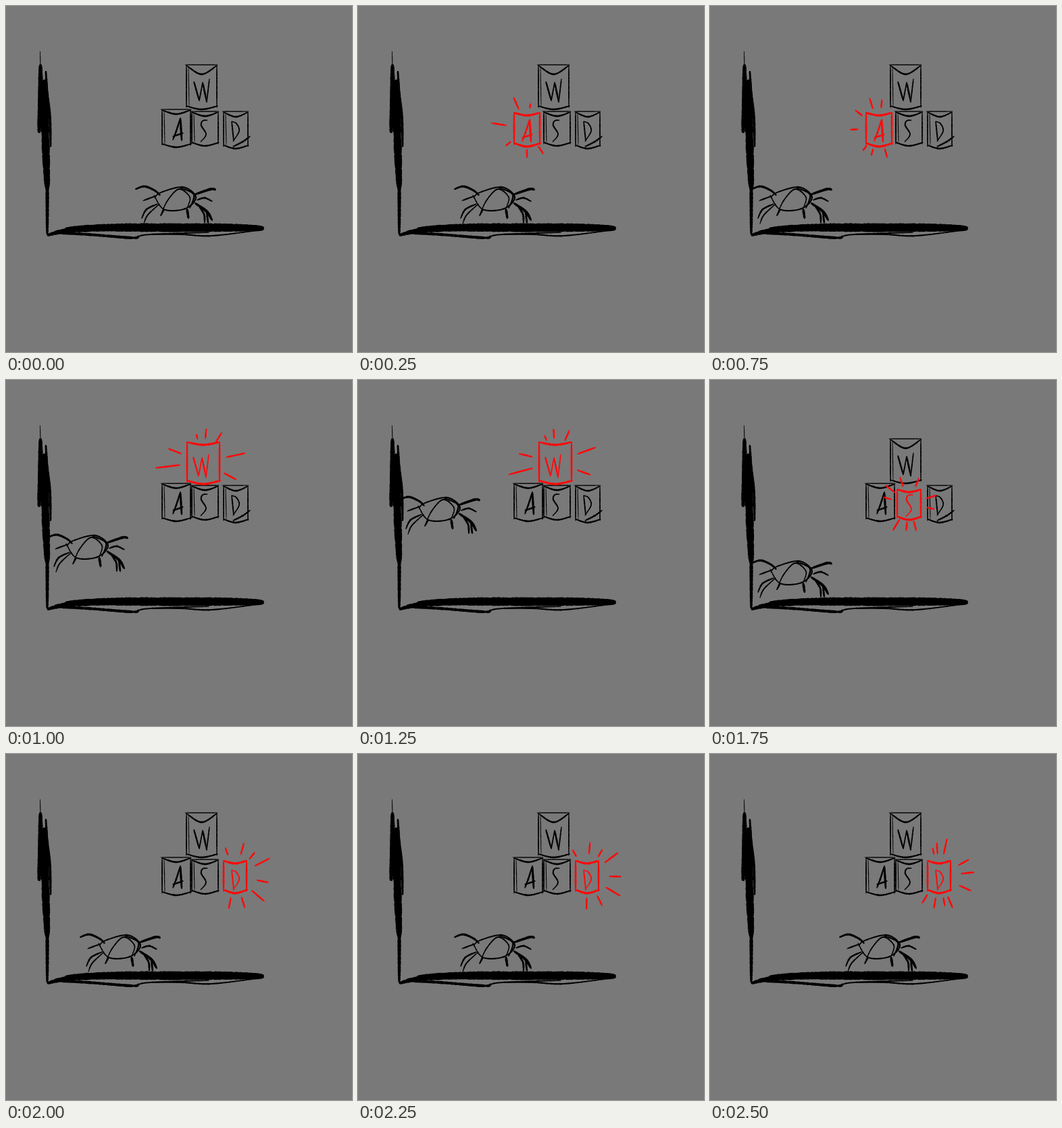
An HTML page with a canvas for the animation above (2.58 s loop, 512x512 px).

```html
<!DOCTYPE html>
<html lang="en">
<head>
<meta charset="utf-8">
<title>Crab controls</title>
<style>
html, body { margin: 0; width: 100%; height: 100%; overflow: hidden; background: #797979; }
canvas { display: block; width: 512px; height: 512px; }
</style>
</head>
<body>
<canvas id="stage" width="512" height="512"></canvas>
<script>
const ctx = document.getElementById('stage').getContext('2d');
const GRAY = '#797979', BLACK = '#000', RED = '#ff0a0a', LOOP = 2580;

const spline = (a, b, c, d, t) =>
  b + t * (c - a + t * (2 * a - 5 * b + 4 * c - d + t * (3 * (b - c) + d - a))) / 2;

// One brush stroke: a smooth line with tapered ends and a slightly rough edge.
function brush(width, ...pts) {
  const last = pts.length / 2 - 1;
  const at = (i, axis) => pts[2 * Math.max(0, Math.min(last, i)) + axis];
  let seed = Math.round(pts[0] * 31 + pts[1] * 17);
  ctx.beginPath();
  for (let i = 0; i < last; i++) {
    const steps = Math.ceil(Math.hypot(at(i + 1, 0) - at(i, 0), at(i + 1, 1) - at(i, 1)) / 0.7);
    for (let k = 0; k <= steps; k++) {
      const t = k / steps;
      const [x, y] = [0, 1].map(n => spline(at(i - 1, n), at(i, n), at(i + 1, n), at(i + 2, n), t));
      const taper = 0.5 + 0.5 * Math.sqrt(Math.max(0, Math.sin(Math.PI * (i + t) / last)));
      seed = (seed * 1103 + 12345) % 65536;
      const r = width / 2 * taper * (0.85 + 0.3 * seed / 65536);
      ctx.moveTo(x + r, y);
      ctx.arc(x, y, r, 0, 2 * Math.PI);
    }
  }
  ctx.fill();
}

function drawGround() {
  brush(1.2, 50.5, 67, 51, 92);
  brush(7, 51, 88, 51, 140, 49, 186);
  brush(4, 59, 97, 61, 130, 65, 165, 66, 208);
  brush(11, 57, 112, 58, 185, 61, 268);
  brush(5, 60, 200, 61, 262, 61, 337);
  brush(6, 62, 339, 90, 332, 130, 329);
  brush(11.5, 90, 331, 150, 328, 250, 328, 330, 328, 379, 329);
  brush(4, 75, 336, 120, 338, 186, 343, 196, 341);
  brush(2.2, 196, 341, 215, 338, 300, 335);
  brush(2.2, 215, 338, 260, 338, 305, 340, 380, 331);
}

function drawCrab() {
  brush(2.2, 220, 284, 229, 276, 262, 268, 281, 283, 265, 300, 234, 301, 219, 280);
  brush(2, 229, 310, 239, 288, 256, 271, 272, 283, 268, 299);
  brush(2.5, 258, 269, 278, 279, 272, 299);
  brush(3.2, 192, 271, 205, 267, 220, 273, 228, 280);
  brush(2.2, 203, 288, 222, 281);
  brush(2.6, 201, 314, 208, 301, 224, 293);
  brush(2, 204, 322, 210, 309, 227, 293);
  brush(2.5, 229, 310, 234, 301);
  brush(3.8, 268, 301, 270, 314);
  brush(3.8, 279, 279, 303, 271, 310, 272);
  brush(2.6, 283, 287, 294, 284, 305, 289);
  brush(4, 280, 292, 297, 304, 305, 317);
  brush(3, 286, 297, 293, 308, 294, 321);
  brush(3, 297, 304, 299, 321);
}

const letters = {
  W() {
    brush(2.6, 278, 112, 286, 140);
    brush(2, 286, 140, 291, 113);
    brush(2.6, 291, 113, 297, 142);
    brush(2, 297, 142, 301, 108);
  },
  A() {
    brush(2.6, 247, 198, 252, 185, 258, 166);
    brush(3.2, 258, 166, 260, 199);
    brush(2.6, 247, 193, 262, 188);
  },
  S() {
    brush(2.2, 298, 169, 291, 170, 289, 177, 296, 190, 288, 201);
  },
  D() {
    brush(2.2, 334, 171, 337, 200);
    brush(2, 334, 171, 341, 174, 345, 185, 336, 200);
  }
};

// box: left, top, right, bottom; glyph: letter shift when lit; ring: where rays begin
const keys = {
  W: { box: [267, 88, 312, 150], lid: 13, litBox: [268, 92, 316, 151], glyph: [-1, 2], ring: 35 },
  A: { box: [231, 154, 273, 206], lid: 6, litBox: [231, 158, 269, 205], glyph: [-4, 2], ring: 31 },
  S: { box: [275, 157, 314, 204], lid: 6, litBox: [277, 162, 312, 204], glyph: [2, 1], ring: 27 },
  D: { box: [322, 157, 358, 208], lid: 7, litBox: [322, 158, 356, 203], glyph: [0, 1], ring: 33 }
};

// Rays around a lit key: angle in degrees, length
const bursts = {
  A: [[-113, 19], [-82, 6], [-171, 22], [141, 9], [90, 12], [57, 13]],
  A2: [[-107, 16], [-84, 12], [-142, 13], [178, 11], [126, 9], [106, 10], [74, 13]],
  W: [[-112, 7], [-93, 14], [-66, 16], [-20, 28], [20, 20], [-167, 20], [165, 36]],
  S: [[-119, 14], [-79, 13], [-152, 17], [-176, 12], [-27, 15], [2, 11], [111, 19], [86, 13], [65, 14]],
  D: [[-109, 11], [-75, 17], [-50, 12], [-27, 24], [11, 17], [41, 24], [73, 16], [101, 16]],
  D2: [[-103, 9], [-94, 16], [-78, 23], [-29, 17], [-6, 19], [25, 19], [122, 14], [99, 15], [79, 12], [67, 18]]
};

function drawCap([l, t, r, b], lid, weight) {
  const mid = (l + r) / 2;
  brush(weight, l, t, l, b);
  brush(weight, r, t, r, b);
  brush(weight + 0.5, l, t, mid, t + lid, r, t);
  brush(weight + 0.5, l, b - 2, mid, b + 3, r + 1, b - 2);
}

function drawKey(name) {
  const { box, lid } = keys[name];
  const [l, t, r, b] = box;
  drawCap(box, lid, 2);
  brush(1.3, l + 3, t + 2, l + 4, b - 2);
  brush(1.5, l - 2, t - 1, r + 1, t - 1);
  if (name === 'D') brush(2.6, 336, 208, 350, 201, 361, 193);
  letters[name]();
}

function drawLitKey(name, burst, turn) {
  const { litBox, glyph, ring } = keys[name];
  const [l, t, r, b] = litBox;
  drawCap(litBox, 4, 2.8);
  ctx.save();
  ctx.translate(...glyph);
  letters[name]();
  ctx.restore();
  for (const [angle, length] of bursts[burst]) {
    const a = (angle + turn) * Math.PI / 180;
    const end = d => [(l + r) / 2 + d * Math.cos(a), (t + b) / 2 + d * Math.sin(a)];
    brush(2.7, ...end(ring), ...end(ring + length));
  }
}

// start ms, crab x, crab y, lit key, burst, turn of the burst
const poses = [
  [0, 0, 0],
  [250, -49, 0, 'A', 'A', 0],
  [500, -82, 0, 'A', 'A', 12],
  [750, -130, 0, 'A', 'A2', 0],
  [920, -130, 0],
  [1000, -130, -38, 'W', 'W', 8],
  [1250, -130, -94, 'W', 'W', 0],
  [1420, -130, -94],
  [1500, -130, -38, 'S', 'S', 0],
  [1750, -130, 0, 'S', 'S', 10],
  [1920, -130, 0],
  [2000, -82, 0, 'D', 'D', 0],
  [2250, -49, 0, 'D', 'D', -10],
  [2500, 0, 0, 'D', 'D2', 0]
];

function draw([, x, y, lit, burst, turn]) {
  ctx.fillStyle = GRAY;
  ctx.fillRect(0, 0, 512, 512);
  ctx.fillStyle = BLACK;
  drawGround();
  for (const name in keys) if (name !== lit) drawKey(name);
  ctx.save();
  ctx.translate(x, y);
  drawCrab();
  ctx.restore();
  if (lit) {
    ctx.fillStyle = RED;
    drawLitKey(lit, burst, turn);
  }
}

const begin = performance.now();
let shown;
function tick() {
  const time = (performance.now() - begin) % LOOP;
  const pose = poses.filter(p => p[0] <= time).pop();
  if (pose !== shown) draw(shown = pose);
  requestAnimationFrame(tick);
}
tick();
</script>
</body>
</html>
```
